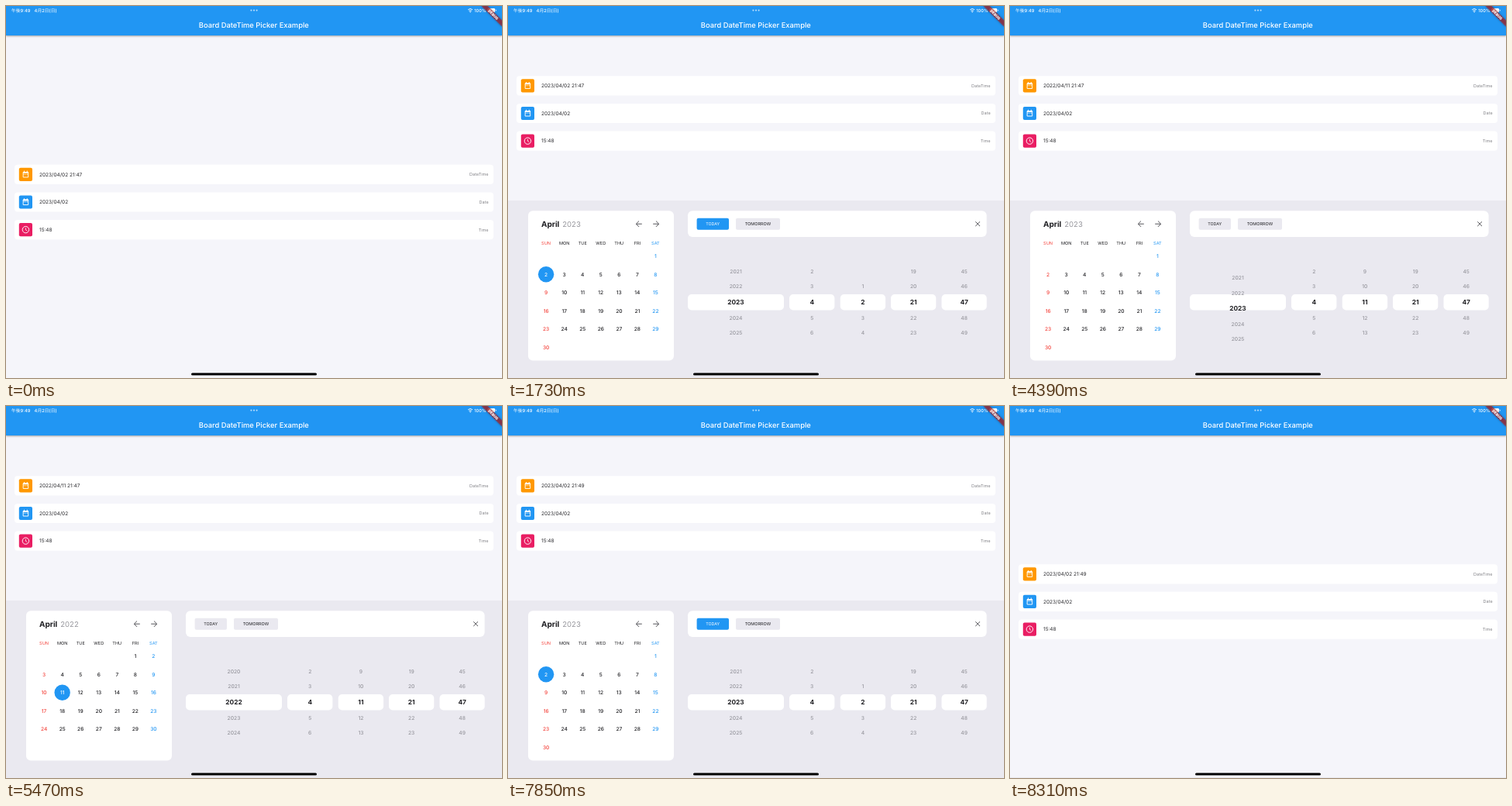
Write an HTML page that moves like this. It is 640x480 px and loops after 8.37 s.

```html
<!DOCTYPE html>
<html lang="en">
<head>
<meta charset="utf-8">
<title>Board DateTime Picker Example</title>
<style>
  html, body { margin: 0; width: 100%; height: 100%; overflow: hidden; background: #f5f5fa; }
  svg { display: block; width: 100vw; height: 100vh; }
  text { font-family: Inter, "Noto Sans CJK JP", "Noto Sans CJK", sans-serif; text-rendering: geometricPrecision; white-space: pre; }
  .bar { filter: drop-shadow(0 1px 1.2px rgba(0, 0, 0, .35)); }
  .banner { filter: drop-shadow(0 0 1.4px rgba(0, 0, 0, .5)); }
  .line { fill: none; stroke: #55555a; stroke-width: 1; }
</style>
</head>
<body>
<svg id="stage" viewBox="0 0 640 480"></svg>
<script>
const LOOP = 8370;
// Screen updates come in bursts: [first, last, count]
const BURSTS = [[1360, 1730, 6], [2910, 3140, 4], [4170, 4710, 8], [5470, 6180, 10], [8090, 8310, 4]];
const BLUE = '#2196f3', RED = '#f4433c', INK = '#202024', PANEL = '#eae9f0';
const PANEL_H = 229, ROW_GAP = 35.6;
const MONTHS = 'January February March April May June July August September October November December'.split(' ');
const WEEK = ['SUN', 'MON', 'TUE', 'WED', 'THU', 'FRI', 'SAT'];
const COL = 23.55, PAGE_W = 166;

const pad = n => String(n).padStart(2, '0');
const dayColor = col => col === 0 ? RED : col === 6 ? BLUE : INK;

// y is the middle of the capitals
function text(x, y, str, size, { fill = INK, weight = 400, anchor = 'middle' } = {}) {
  return `<text x="${x}" y="${y + size * .36}" font-size="${size}" font-weight="${weight}" fill="${fill}" text-anchor="${anchor}">${str}</text>`;
}
function box(x, y, w, h, r, fill, extra = '') {
  return `<rect x="${x}" y="${y}" width="${w}" height="${h}" rx="${r}" fill="${fill}" ${extra}/>`;
}

const calendarIcon = `<g transform="translate(19.8 -5.8) scale(.468)">
  <path d="M5 6h14v14H5z" fill="none" stroke="#fff" stroke-width="2" stroke-linejoin="round"/>
  <path d="M5 5h14v4H5zM7 2h2v4H7zM15 2h2v4h-2zM7 11h2v2H7zM11 11h2v2h-2zM15 11h2v2h-2z" fill="#fff"/></g>`;
const clockIcon = `<g transform="translate(19.8 -5.6) scale(.468)" fill="none" stroke="#fff" stroke-width="2">
  <circle cx="12" cy="12" r="9"/><path d="M12 7v5.5l4 2.4" stroke-width="1.7"/></g>`;

const rows = [
  { color: '#ff9800', icon: calendarIcon, value: '', label: 'DateTime' },
  { color: BLUE, icon: calendarIcon, value: '2023/04/02', label: 'Date' },
  { color: '#e91e63', icon: clockIcon, value: '15:48', label: 'Time' },
];

function row({ color, icon, value, label }, i) {
  const splash = i ? '' : '<g clip-path="url(#rowClip)"><circle id="splash" cx="225.5" cy="0" fill="#f0f0f4"/></g>';
  return `<g transform="translate(0 ${217.4 + i * ROW_GAP})">
    ${box(11, -12.6, 618, 25.2, 4, '#fff')}${splash}
    ${box(16.8, -8.6, 17.2, 17.2, 2, color)}${icon}
    <g id="value${i}">${rowValue(value)}</g>
    ${text(622.6, 0, label, 5.5, { fill: '#85858a', anchor: 'end' })}</g>`;
}
function rowValue(value) {
  return text(43, 0, value, 6.5, { anchor: 'start', fill: '#2c2c30' });
}

const wheels = [
  { x: 232, w: 124, min: 2000, max: 2050 },
  { x: 363, w: 58.4, min: 1, max: 12 },
  { x: 428.7, w: 58.4, min: 1, max: 30 },
  { x: 494, w: 58.3, min: 0, max: 23 },
  { x: 559.5, w: 58.2, min: 0, max: 59 },
];

function wheelItems({ x, w, min, max }, pos) {
  const mid = Math.round(pos);
  let out = '';
  for (let n = Math.max(min, mid - 3); n <= Math.min(max, mid + 3); n++) {
    const d = n - pos;
    if (Math.abs(d) > 2.5) continue;
    const y = 382.2 + 20.3 * d - .14 * d ** 3;
    out += n === mid
      ? text(x + w / 2, y, n, 8.3, { weight: 700 })
      : text(x + w / 2, y, n, 6.7, { weight: 500, fill: '#97979e' });
  }
  return out;
}

function monthPage(index, pos, picked) {
  const year = Math.floor(index / 12), month = index % 12;
  const first = new Date(year, month, 1).getDay();
  const count = new Date(year, month + 1, 0).getDate();
  let out = `<g transform="translate(${(index - pos) * PAGE_W} 0)">`;
  for (let day = 1; day <= count; day++) {
    const cell = first + day - 1, col = cell % 7;
    const x = 49.1 + col * COL, y = 322.7 + Math.floor(cell / 7) * 23.53;
    const on = month === 3 && year === picked.year && day === picked.day;
    if (on) out += `<circle cx="${x}" cy="${y}" r="10.2" fill="${BLUE}"/>`;
    out += text(x, y, day, 6.6, { weight: 500, fill: on ? '#fff' : dayColor(col) });
  }
  return out + '</g>';
}

function monthTitle(index) {
  const name = MONTHS[index % 12];
  return `<text x="43" y="284.6" font-size="10" font-weight="700" fill="${INK}">${name}<tspan dx="4" font-size="9.5" font-weight="400" fill="#98989e">${Math.floor(index / 12)}</tspan></text>`;
}

const panel = `${box(0, 251, 640, 240, 0, PANEL)}
  ${box(26, 264.2, 188, 193.3, 6, '#fff')}
  <g id="title"></g>
  <path class="line" d="M172.8 281.2h-7.4m3.6-3.7l-3.7 3.7 3.7 3.7M187.2 281.2h7.4m-3.6-3.7l3.7 3.7-3.7 3.7"/>
  ${WEEK.map((name, i) => text(49.1 + i * COL, 305.6, name, 5.6, { fill: dayColor(i) })).join('')}
  <g id="pages" clip-path="url(#pageClip)"></g>
  ${box(232, 264.2, 385.6, 33.8, 6, '#fff')}
  <g id="today"></g>
  ${box(294, 273.7, 57, 15, 2, PANEL)}${text(322.4, 281.2, 'TOMORROW', 5.5)}
  <path class="line" d="M603.2 278.3l5.8 5.8m0-5.8l-5.8 5.8"/>
  ${wheels.map(({ x, w }) => box(x, 372, w, 20.5, 5, '#fff')).join('')}
  <g id="wheels"></g>`;

const white = { fill: '#fff', weight: 500, anchor: 'start' };
const appBar = `${box(0, 0, 640, 38, 0, BLUE, 'class="bar"')}
  ${text(319.8, 24.4, 'Board DateTime Picker Example', 9.35, { fill: '#fff', weight: 500 })}
  ${text(7, 5.6, '午後9:49', 5.8, white)}${text(36.6, 5.6, '4月2日(日)', 5.8, white)}
  ${[316.4, 320, 323.6].map(x => `<circle cx="${x}" cy="5.6" r="1.1" fill="#fff" opacity=".65"/>`).join('')}
  <path d="M596.2 4.8a4.2 4.2 0 0 1 5.8 0M597.4 6.3a2.5 2.5 0 0 1 3.4 0" fill="none" stroke="#fff" stroke-width=".9"/>
  <circle cx="599.1" cy="7.6" r=".8" fill="#fff"/>
  ${text(604.2, 5.6, '100%', 5.7, white)}
  ${box(621.2, 3.1, 10, 5, 1.5, '#fff')}${box(631.9, 4.7, .8, 1.8, .4, '#fff')}
  <g transform="translate(640 0) rotate(45)">
    ${box(-18.75, 13.1, 37.5, 5.65, 0, 'rgba(183,28,28,.68)', 'class="banner"')}
    ${text(0, 15.95, 'DEBUG', 4.7, { fill: '#fff', weight: 900 })}</g>`;

const $ = id => document.getElementById(id);
$('stage').innerHTML = `<defs>
    <clipPath id="rowClip">${box(11, -12.6, 618, 25.2, 4, '#000')}</clipPath>
    <clipPath id="pageClip">${box(37, 311, PAGE_W, 143, 0, '#000')}</clipPath></defs>
  ${box(0, 0, 640, 480, 0, '#f5f5fa')}
  <g id="list">${rows.map(row).join('')}</g>
  <g id="panel">${panel}</g>${appBar}
  ${box(239, 473.4, 162, 3, 1.5, '#000')}`;

function snap(t) {
  let shown = 0;
  for (const [start, end, count] of BURSTS) {
    if (t < start) break;
    const step = (end - start) / (count - 1);
    shown = Math.min(end, start + Math.floor((t - start) / step + 1e-6) * step);
  }
  return shown;
}

function draw(t) {
  const clamp = v => Math.max(0, Math.min(1, v));
  const linear = (from, to) => clamp((t - from) / (to - from));
  const ease = (from, to) => { const u = linear(from, to); return u * u * (3 - 2 * u); };

  const height = PANEL_H * (ease(1492, 1730) - ease(8070, 8320));
  $('list').setAttribute('transform', `translate(0 ${-height / 2})`);
  $('panel').setAttribute('transform', `translate(0 ${PANEL_H - height})`);

  $('splash').setAttribute('r', t < 1360 ? 0 : 14 + 88 * linear(1360, 1582));
  $('splash').setAttribute('opacity', 1 - linear(1582, 1730));

  const reset = t > 5470;
  const picked = {
    year: t > 4170 && !reset ? 2022 : 2023,
    day: t > 2910 && !reset ? 11 : 2,
  };
  const back = ease(5480, 5850);
  const year = 2023 - ease(4110, 4600) + back;
  const day = 2 + 9 * (ease(2900, 3140) - back);
  const month = 2023 * 12 + 3 - 12 * (ease(4400, 4710) - ease(5640, 6180));

  $('value0').innerHTML = rowValue(`${picked.year}/04/${pad(picked.day)} 21:${reset ? 49 : 47}`);
  $('wheels').innerHTML = [year, 4, day, 21, 47].map((pos, i) => wheelItems(wheels[i], pos)).join('');
  $('title').innerHTML = monthTitle(Math.round(month));
  const left = Math.floor(month);
  $('pages').innerHTML = monthPage(left, month, picked) + (month > left ? monthPage(left + 1, month, picked) : '');
  const active = picked.day === 2;
  $('today').innerHTML = box(243.6, 273.7, 41.4, 15, 2, active ? BLUE : PANEL)
    + text(264.2, 281.2, 'TODAY', 5.4, { fill: active ? '#fff' : INK });
}

const began = performance.now();
let last = -1;
function tick() {
  const t = snap((performance.now() - began) % LOOP);
  if (t !== last) draw(last = t);
  requestAnimationFrame(tick);
}
tick();
</script>
</body>
</html>
```
